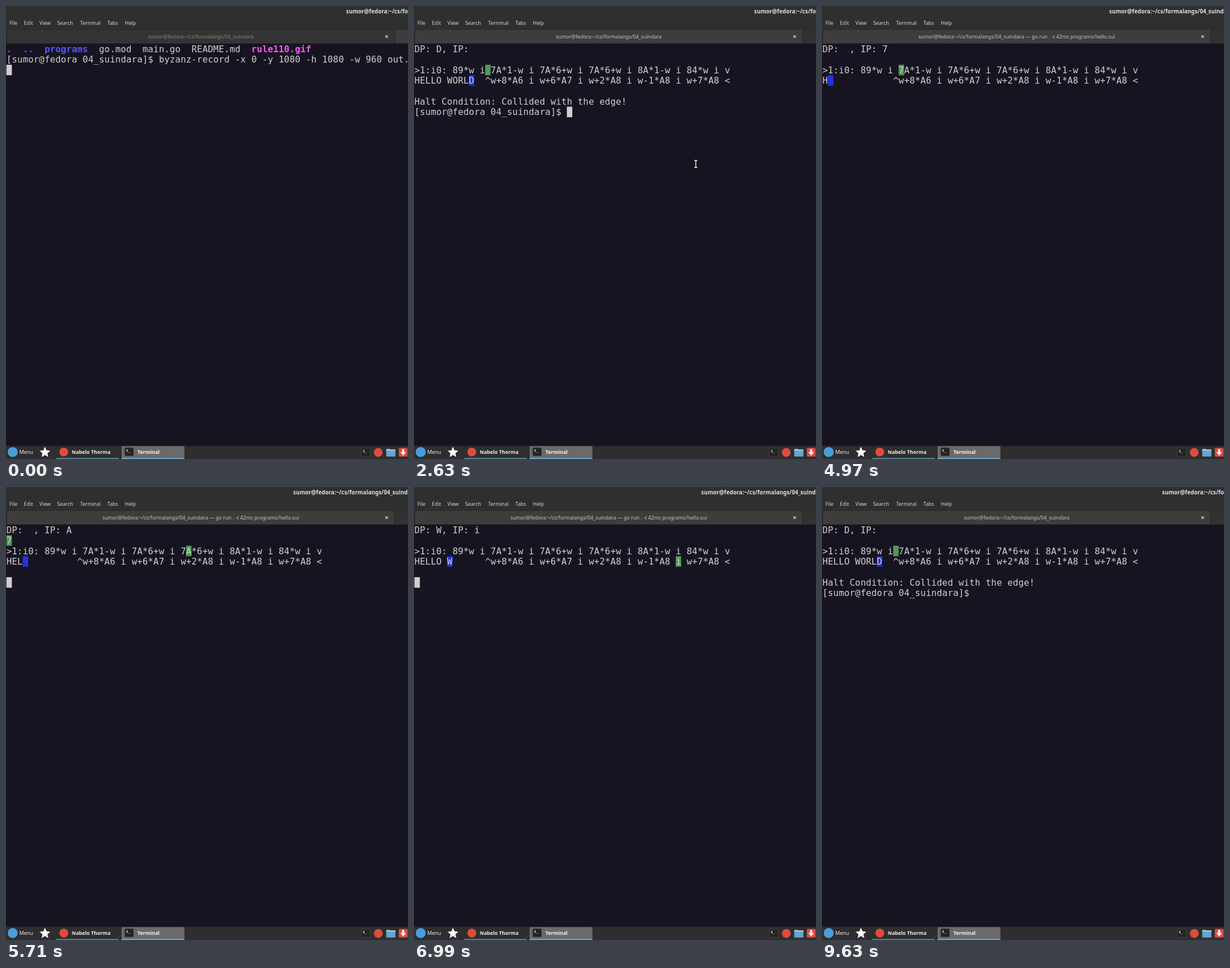
Animation of 706 by 794 pixels, one loop 9680 ms. Source, as an HTML page with a canvas:

```html
<!DOCTYPE html>
<html lang="en">
<head>
<meta charset="utf-8">
<title>Terminal</title>
<style>
  html, body { margin: 0; width: 100%; height: 100%; overflow: hidden; background: #171421; }
  canvas { display: block; width: 706px; height: 794px; }
</style>
</head>
<body>
<canvas id="stage" width="706" height="794"></canvas>
<script>
const ctx = document.getElementById('stage').getContext('2d');
const LOOP = 9680;
const SCALE = 706 / 960;          // the desktop is laid out in 960 x 1080 units
const CELL_W = 13, CELL_H = 25, TERM_X = 1, TERM_Y = 90;
const MONO = '"DejaVu Sans Mono", monospace';
const SANS = '"Noto Sans", sans-serif';
const FG = '#d0cfcc', BG = '#171421';
const GREEN = '#4e9a55', BLUE = '#2333dc', RED = '#cd3131';

const PROMPT = '[sumor@fedora 04_suindara]$ ';
const TITLE = 'sumor@fedora:~/cs/formalangs/04_suindara';
const COMMAND = 'go run . -t 42ms programs/hello.sui ';
const PROGRAM = [
  '>1:i0: 89*w i 7A*1-w i 7A*6+w i 7A*6+w i 8A*1-w i 84*w i v',
  ' '.repeat(13) + '^w+8*A6 i w+6*A7 i w+2*A8 i w-1*A8 i w+7*A8 <'
];
const HEADINGS = [[1, 0], [0, 1], [-1, 0], [0, -1]];

// Runs the two-dimensional program and records the state before every step.
function runProgram(source) {
  const grid = source.map(line => [...line]);
  const ip = { x: 0, y: 0, dir: 0 }, dp = { x: 0, y: 0, dir: 0 };
  const stack = [], states = [];
  const advance = p => {
    p.x += HEADINGS[p.dir][0];
    p.y += HEADINGS[p.dir][1];
  };
  const math = { '+': (a, b) => a + b, '-': (a, b) => a - b, '*': (a, b) => a * b };
  while (grid[ip.y] && grid[ip.y][ip.x] !== undefined) {
    states.push({ ip: { ...ip }, dp: { ...dp }, stack: [...stack], rows: grid.map(r => r.join('')) });
    const op = grid[ip.y][ip.x];
    if (/[0-9A-F]/.test(op)) stack.push(parseInt(op, 16));
    else if (math[op]) {
      const b = stack.pop(), a = stack.pop();
      stack.push(math[op](a, b));
    }
    else if (op === ':') dp.dir = stack.pop();
    else if (op === 'i') advance(dp);
    else if (op === 'w') grid[dp.y][dp.x] = String.fromCharCode(stack.pop());
    else if ('>v<^'.includes(op)) ip.dir = '>v<^'.indexOf(op);
    advance(ip);
  }
  return states;
}
const STATES = runProgram(PROGRAM);
const LAST = STATES.length - 1;

// Time and step pairs; the screen refreshes every 50 ms between them.
const PACE = [[4340, 0], [5710, 33], [6990, 67], [7180, 72], [7280, 73], [8180, 95], [8440, LAST]];

function stepAt(t) {
  if (t >= 8440) return LAST;
  let k = 0;
  while (t >= PACE[k + 1][0]) k++;
  const [t0, s0] = PACE[k], [t1, s1] = PACE[k + 1];
  const snapped = Math.floor((t - t0) / 50) * 50;
  return Math.floor(s0 + (s1 - s0) * snapped / (t1 - t0));
}

function box(x, y, w, h, color) {
  ctx.fillStyle = color;
  ctx.fillRect(x, y, w, h);
}

function rounded(x, y, w, h, r, color) {
  ctx.fillStyle = color;
  ctx.beginPath();
  ctx.roundRect(x, y, w, h, r);
  ctx.fill();
}

function disc(x, y, r, color) {
  ctx.fillStyle = color;
  ctx.beginPath();
  ctx.arc(x, y, r, 0, Math.PI * 2);
  ctx.fill();
}

function label(text, x, y, { color = '#d8d8d8', size = 12, weight = 400, align = 'left' } = {}) {
  ctx.font = `${weight} ${size}px ${SANS}`;
  ctx.textAlign = align;
  ctx.fillStyle = color;
  ctx.fillText(text, x, y);
}

function fillCell(col, row, color) {
  box(TERM_X + col * CELL_W, TERM_Y + row * CELL_H, CELL_W, CELL_H, color);
}

function print(text, col, row, color = FG, weight = 400) {
  ctx.font = `${weight} 21.33px ${MONO}`;
  ctx.textAlign = 'left';
  ctx.fillStyle = color;
  [...text].forEach((ch, i) => {
    if (ch !== ' ') ctx.fillText(ch, TERM_X + (col + i) * CELL_W, TERM_Y + row * CELL_H + 20);
  });
}

function drawListing() {
  print('.  ..  programs', 0, 0, '#5555ff', 700);
  print('go.mod  main.go  README.md', 17, 0);
  print('rule110.gif', 45, 0, '#ff55ff', 700);
  print(PROMPT + 'byzanz-record -x 0 -y 1080 -h 1080 -w 960 out.gif', 0, 1);
}

function drawState({ ip, dp, stack, rows }) {
  const same = ip.x === dp.x && ip.y === dp.y;
  fillCell(dp.x, dp.y + 2, BLUE);
  fillCell(ip.x, ip.y + 2, same ? RED : GREEN);
  print(`DP: ${rows[dp.y][dp.x]}, IP: ${rows[ip.y][ip.x]}`, 0, 0);
  let col = 0;
  stack.forEach((value, i) => {
    const text = String(value);
    if (i === stack.length - 1) {
      for (let c = 0; c < text.length; c++) fillCell(col + c, 1, GREEN);
    }
    print(text, col, 1);
    col += text.length + 1;
  });
  rows.forEach((row, i) => print(row, 0, i + 2));
}

function drawCursor(t) {
  let col = 0, row = 5, on = true;
  const blink = (start, half) => Math.floor((t - start) / half) % 2 === 0;
  if (t < 200) row = 2;
  else if (t < 4240) {
    row = 6;
    col = PROMPT.length + (t < 3600 ? 0 : COMMAND.length);
    on = t < 250 || t >= 3600 || blink(250, 595);
  } else {
    on = blink(4240, 562.5);
    if (t < 4340) row = 7;
    if (t >= 8490) {
      row = 6;
      col = PROMPT.length;
      on = t >= 8740 && t < 9630;
    }
  }
  if (on) fillCell(col, row, FG);
}

function drawTerminal(t) {
  box(0, 89, 960, 959, BG);
  if (t < 200) drawListing();
  else {
    const running = t >= 4340 && t < 8490;
    drawState(STATES[running ? stepAt(t) : LAST]);
    if (!running) {
      print('Halt Condition: Collided with the edge!', 0, 5);
      print(PROMPT + (t >= 3600 && t < 4340 ? COMMAND : ''), 0, 6);
    }
  }
  drawCursor(t);
}

function drawPointer() {
  const bar = (x, y, w, h) => {
    box(x - 1, y - 1, w + 2, h + 2, '#0c0b10');
  };
  const parts = [[669, 367, 8, 2], [672, 368, 2, 17], [669, 384, 8, 2]];
  parts.forEach(p => bar(...p));
  parts.forEach(p => box(...p, '#f4f4f4'));
}

const MENUS = [['File', 8, 0], ['Edit', 43, 0], ['View', 80, 0], ['Search', 122, 0],
  ['Terminal', 177, 0], ['Tabs', 242, 2], ['Help', 284, 0]];

function drawHeader(t) {
  const focused = t >= 200;
  const busy = t >= 4390 && t < 8490;
  const title = busy ? `${TITLE} — ${COMMAND.trim()}` : TITLE;

  box(0, 0, 960, 89, '#2f2f2f');
  label(title, 960, 18, { size: 13.33, weight: 700, align: 'center', color: '#dedede' });
  MENUS.forEach(([text, x, key]) => {
    label(text, x, 45);
    if (t >= 400 && t < 550) {
      const left = x + ctx.measureText(text.slice(0, key)).width;
      box(left, 46, ctx.measureText(text[key]).width, 1, '#d8d8d8');
    }
  });

  box(0, 56, 960, 33, '#2b2b2b');
  box(2, 57, 926, 32, focused ? '#3d3d3d' : '#343434');
  box(929, 57, 31, 32, focused ? '#323232' : '#3d3d3d');
  box(928, 57, 1, 32, '#222222');
  box(1, 57, 1, 32, '#242424');
  label(title, 465, 78, { align: 'center', color: focused ? '#c4c4c4' : '#858585' });
  ctx.strokeStyle = '#d0d0d0';
  ctx.lineWidth = 1.8;
  ctx.beginPath();
  ctx.moveTo(906, 70); ctx.lineTo(912, 76);
  ctx.moveTo(912, 70); ctx.lineTo(906, 76);
  ctx.stroke();
}

function drawStar(x, y, r) {
  ctx.fillStyle = '#ffffff';
  ctx.beginPath();
  for (let i = 0; i < 10; i++) {
    const a = i * Math.PI / 5 - Math.PI / 2, d = i % 2 ? r * 0.46 : r;
    ctx.lineTo(x + d * Math.cos(a), y + d * Math.sin(a));
  }
  ctx.fill();
}

function drawShellIcon(x, y) {
  rounded(x, y, 22, 21, 3, '#4b4b4b');
  rounded(x + 1, y + 1, 20, 19, 2, '#232323');
  ctx.font = `700 8px ${MONO}`;
  ctx.textAlign = 'left';
  ctx.fillStyle = '#e4e4e4';
  ctx.fillText('$_', x + 4, y + 10);
}

function drawTaskbar() {
  box(0, 1048, 960, 32, '#2e2e2e');
  box(0, 1048, 960, 1, '#232323');
  disc(16, 1063, 12, '#4b9cdb');
  label('Menu', 32, 1068, { color: '#f0f0f0' });
  drawStar(93, 1064, 13.5);

  box(120, 1077, 149, 3, '#567f91');
  disc(138, 1063, 10.5, '#dd4b3e');
  label('Nabelo Thorma', 157, 1067, { weight: 700, color: '#ededed' });

  box(276, 1049, 150, 31, '#6a6a6a');
  box(276, 1077, 150, 3, '#70a5c4');
  drawShellIcon(283, 1052);
  label('Terminal', 314, 1067, { weight: 700, color: '#f4f4f4' });

  drawShellIcon(848, 1053);
  disc(889, 1064, 10.5, '#dd4b3e');

  rounded(908, 1055, 10, 8, 2, '#4586b5');
  rounded(908, 1058, 22, 16, 2, '#64a5d1');
  box(908, 1057, 22, 2, '#d5e4ee');

  rounded(938, 1053, 21, 21, 3, '#e2493f');
  box(946, 1056, 5, 8, '#ffffff');
  ctx.beginPath();
  ctx.moveTo(941.5, 1063);
  ctx.lineTo(955.5, 1063);
  ctx.lineTo(948.5, 1071);
  ctx.fill();
}

function draw(t) {
  ctx.setTransform(SCALE, 0, 0, SCALE, 0, 0);
  drawTerminal(t);
  drawHeader(t);
  drawTaskbar();
  if (t >= 200 && t < 3640) drawPointer();
}

const start = performance.now();
function tick() {
  draw((performance.now() - start) % LOOP);
  requestAnimationFrame(tick);
}
tick();
</script>
</body>
</html>
```
